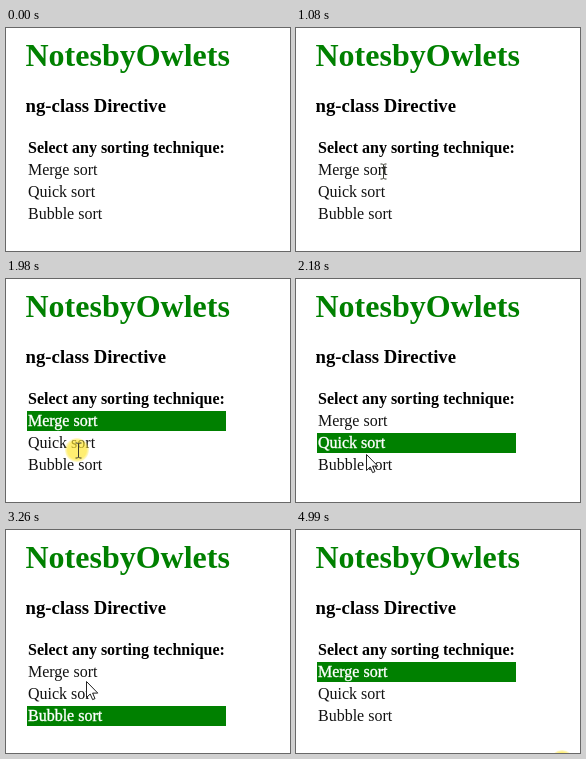
Write an HTML page that moves like this. It is 284 px wide and 223 px high and loops after 5060 ms.

```html
<!DOCTYPE html>
<html lang="en">
<head>
<meta charset="utf-8">
<title>ng-class Directive</title>
<style>
  html, body { margin: 0; width: 100%; height: 100%; overflow: hidden; background: #fff; }
  svg { display: block; font: 16px "Liberation Serif", "Times New Roman", serif; }
  .bold { font-weight: bold; }
  .picked { fill: #fff; stroke: #fff; stroke-width: .35px; }
</style>
</head>
<body>
<svg width="284" height="223" viewBox="0 0 284 223">
  <defs>
    <radialGradient id="glow">
      <stop offset=".78" stop-color="#ffe62e" stop-opacity=".68"/>
      <stop offset="1" stop-color="#ffe62e" stop-opacity=".2"/>
    </radialGradient>
  </defs>
  <text class="bold" x="19.5" y="38" font-size="32" fill="green">NotesbyOwlets</text>
  <text class="bold" x="19.6" y="84" font-size="18.72">ng-class Directive</text>
  <text class="bold" x="22" y="125">Select any sorting technique:</text>
  <rect id="bar" x="21" width="199" height="20" fill="green"/>
  <g id="rows" fill="#111"></g>
  <circle id="halo" r="12" fill="url(#glow)"/>
  <path id="arrow" d="M.5 .5V16.5L4.2 13 6.6 18.6 9 17.6 6.6 12.1H11.8Z"
    fill="#fff" stroke="#222" stroke-linejoin="round"/>
  <path id="beam" d="M-3 -7.5H-1L0 -6.5 1 -7.5H3M0 -6.5V6.5M-3 7.5H-1L0 6.5 1 7.5H3" fill="none"/>
</svg>
<script>
const LOOP = 5060, TICKS = 76;
const LEFT = 22, ROW_TOP = 132, ROW_STEP = 22, LINE = 18;
const NS = "http://www.w3.org/2000/svg";
const [bar, rows, halo, arrow, beam] =
  ["bar", "rows", "halo", "arrow", "beam"].map(id => document.getElementById(id));

const labels = ["Merge sort", "Quick sort", "Bubble sort"].map((name, i) => {
  const label = document.createElementNS(NS, "text");
  label.setAttribute("x", LEFT);
  label.setAttribute("y", ROW_TOP + 15 + i * ROW_STEP);
  label.textContent = name;
  return rows.appendChild(label);
});

// The pointer glides from stop to stop; times are in ticks
const start = { x: 232, y: 225 };
const glides = [
  { from: 1, to: 10, x: 124, y: 142 },
  { from: 10, to: 16, x: 87, y: 143 },
  { from: 20, to: 27, x: 72, y: 171 },
  { from: 32, to: 36, x: 62, y: 188 },
  { from: 42, to: 49, x: 80, y: 151 },
  { from: 56, to: 57, x: 83, y: 149 },
  { from: 60, to: 64, x: 175, y: 230 },
  { from: 74, to: 75, x: 267, y: 232 }
];
const clicks = [
  { press: 19, release: 20 },
  { press: 29, release: 31 },
  { press: 39, release: 41 },
  { press: 57, release: 58 },
  { press: 75, release: 76 }
];

function pointerAt(tick) {
  let { x, y } = start;
  for (const g of glides) {
    const k = Math.min(1, Math.max(0, (tick - g.from) / (g.to - g.from)));
    x += (g.x - x) * k;
    y += (g.y - y) * k;
  }
  return { x: Math.round(x), y: Math.round(y) };
}

const rowAt = y => Math.floor((y - ROW_TOP) / ROW_STEP);

function overText({ x, y }) {
  const label = labels[rowAt(y)];
  return Boolean(label) && x >= LEFT && x < LEFT + label.getComputedTextLength()
    && (y - ROW_TOP) % ROW_STEP <= LINE;
}

function place(el, visible, x, y) {
  el.style.display = visible ? "" : "none";
  el.setAttribute("transform", `translate(${x} ${y})`);
}

function draw(t) {
  // Ticks fall slightly early because delays are rounded down
  const tick = Math.min(TICKS - 1, Math.floor((t + 20) / LOOP * TICKS));
  const pos = pointerAt(tick);
  const done = clicks.findLast(c => tick >= c.release);
  const selected = done ? rowAt(pointerAt(done.release).y) : -1;

  place(bar, done, 0, ROW_TOP + selected * ROW_STEP);
  labels.forEach((label, i) => label.classList.toggle("picked", i === selected));

  const pressed = clicks.some(c => tick >= c.press && tick < c.release);
  place(halo, pressed, pos.x - 1, pos.y);

  const isBeam = overText(pos);
  place(arrow, !isBeam, pos.x, pos.y);
  place(beam, isBeam, pos.x + 0.5, pos.y + 0.5);
  beam.setAttribute("stroke", rowAt(pos.y) === selected ? "#e4dfe4" : "#3a3a30");
}

function tickLoop() {
  draw(performance.now() % LOOP);
  requestAnimationFrame(tickLoop);
}
tickLoop();
</script>
</body>
</html>
```
